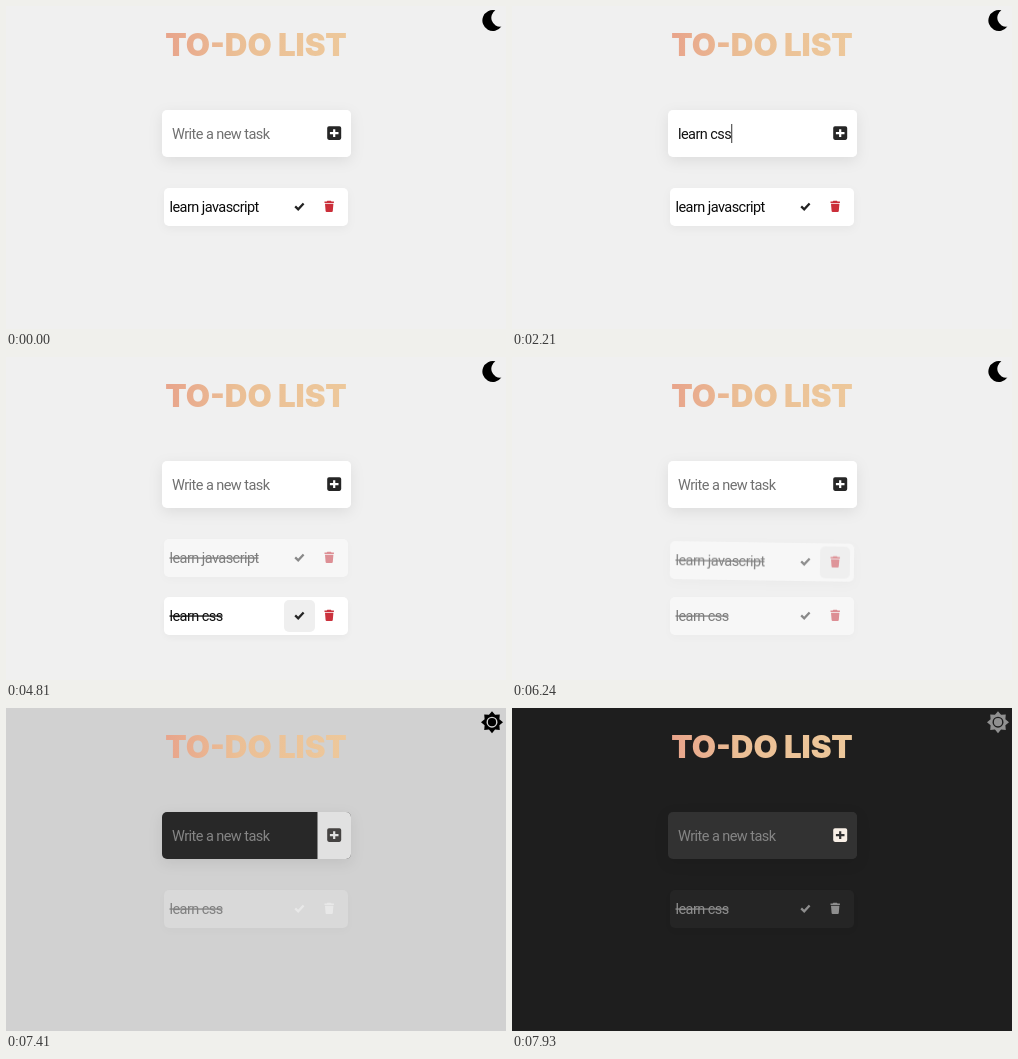
An HTML page for the animation above (8 s loop, 500 by 323 pixels).

```html
<!DOCTYPE html>
<html lang="en">
<head>
<meta charset="utf-8">
<title>To-do list</title>
<style>
  html, body { margin: 0; width: 100%; height: 100%; overflow: hidden; background: #f0f0f0; }
  svg { display: block; width: 100%; height: 100%; }
  text { font: 400 14.5px Roboto, Arial, sans-serif; letter-spacing: -.55px; white-space: pre; }
  #title { font: 900 31.3px Inter, sans-serif; letter-spacing: 0; fill: url(#peach); }
  #field { filter: drop-shadow(0 4px 7px rgba(0, 0, 0, .08)); }
  .card { filter: drop-shadow(0 3px 4px rgba(0, 0, 0, .04)); }
  .task { transform-box: fill-box; transform-origin: center; }
  .hover { fill: #efefef; opacity: 0; }
  .strike { opacity: 0; }
</style>
</head>
<body>
<svg viewBox="0 0 500 323">
  <defs>
    <linearGradient id="peach">
      <stop offset="0" stop-color="#e8a48b"/>
      <stop offset=".4" stop-color="#ebbf95"/>
      <stop offset="1" stop-color="#edc89b"/>
    </linearGradient>
    <clipPath id="fieldShape"><rect x="156" y="104" width="189" height="47" rx="5"/></clipPath>
  </defs>

  <rect id="page" width="500" height="323"/>
  <text id="title" x="250" y="50" text-anchor="middle">TO-DO LIST</text>

  <path id="moon" d="M489.4 4.3A10.5 10.5 0 1 0 495.4 20.6A8.9 8.9 0 0 1 489.4 4.3Z"/>
  <path id="sun" fill-rule="evenodd"/>

  <rect id="field" x="156" y="104" width="189" height="47" rx="5"/>
  <rect id="button" x="311.5" y="104" width="34" height="47" clip-path="url(#fieldShape)"/>
  <path id="plus" fill-rule="evenodd" d="M323 120.3h10.4q1.8 0 1.8 1.8v10q0 1.8-1.8 1.8h-10.4q-1.8 0-1.8-1.8v-10q0-1.8 1.8-1.8z
    M327.1 123.2v2.8h-3.2v2.2h3.2v2.8h2.2v-2.8h3.2v-2.2h-3.2v-2.8z"/>
  <text id="hint" x="166" y="133">Write a new task</text>
  <text id="typed" x="166" y="133" fill="#111"></text>
  <rect id="caret" y="118" width="1" height="19" fill="#333"/>

  <g id="list"></g>
</svg>

<script>
const LOOP = 8000, STEP = 130;
const ADDED = 2600, DROP = 6210, DARK = 7345, FADE = 500;
const $ = selector => document.querySelector(selector);

const taskMarkup = (id, label, width) => `
  <g transform="translate(158 182)"><g id="${id}Place"><g id="${id}" class="task">
    <rect class="card" width="184" height="38" rx="5"/>
    <rect class="hover check" x="120" y="3" width="31" height="32" rx="5"/>
    <rect class="hover bin" x="150" y="3" width="30" height="32" rx="5"/>
    <text class="label" x="5.5" y="23.8">${label}</text>
    <rect class="label strike" x="5.5" y="18.4" width="${width}" height="1.3"/>
    <path class="tick" d="M131.2 18.4l3 2.9 5.4-5.8" fill="none" stroke-width="2.3"/>
    <path class="trash" d="M163.3 12.8h3.6l.6 .8h2.4v1.5h-9.4v-1.5h2.2zM161 15.8h8.4l-.6 7.2q-.1 1-1 1h-5.2q-.9 0-1-1z"/>
  </g></g></g>`;
$('#list').innerHTML = taskMarkup('script', 'learn javascript', 89) + taskMarkup('css', 'learn css', 53);

// Eight-pointed star with a ring cut out around the core
const circle = r => `M${486 - r} 14.2a${r} ${r} 0 1 0 ${2 * r} 0a${r} ${r} 0 1 0 ${-2 * r} 0z`;
const star = Array.from({ length: 16 }, (_, i) => {
  const angle = i * Math.PI / 8, r = i % 2 ? 8 : 11;
  return `${486 + r * Math.cos(angle)} ${14.2 + r * Math.sin(angle)}`;
});
$('#sun').setAttribute('d', `M${star.join('L')}Z` + circle(5.5) + circle(4.1));

// Each change is [start ms, duration ms, new value]; duration 0 is a hard switch
const animations = [];
function track(selector, prop, value, ...changes) {
  const frames = [];
  const add = (ms, easing = 'linear') => frames.push({ [prop]: value, offset: ms / LOOP, easing });
  add(0);
  for (const [start, duration, next] of changes) {
    add(start, 'ease');
    value = next;
    add(start + duration);
  }
  add(LOOP);
  for (const element of document.querySelectorAll(selector)) {
    const animation = element.animate(frames, { duration: LOOP, iterations: Infinity });
    animation.pause();
    animations.push(animation);
  }
}

// Adding and typing
track('#hint', 'opacity', 1, [1040, 0, 0], [ADDED, 0, 1]);
track('#caret', 'opacity', 0, [520, 0, 1], [ADDED, 0, 0]);

// First task: completed, then dropped
track('#script .check', 'opacity', 0, [3200, 400, 1], [4250, 150, 0]);
track('#script .bin', 'opacity', 0, [5580, 0, 1]);
track('#script .strike', 'opacity', 0, [3860, 0, 1]);
track('#script', 'opacity', 1, [3860, FADE, .5], [DROP, FADE, 0]);
track('#script', 'transform', 'translate(0px, 0px) rotate(0deg)',
  [DROP, FADE, 'translate(0px, 80px) rotate(20deg)']);

// Second task: added, completed, moved up
track('#css', 'opacity', 0, [ADDED, 0, 1], [4790, FADE, .5]);
track('#css .check', 'opacity', 0, [4260, 150, 1], [5200, 130, 0]);
track('#css .strike', 'opacity', 0, [4790, 0, 1]);
track('#cssPlace', 'transform', 'translate(0px, 58px)', [DROP + FADE, 0, 'translate(0px, 0px)']);

// Dark theme
track('#page', 'fill', '#f0f0f0', [DARK, FADE, '#1e1e1e']);
track('#field', 'fill', '#fff', [DARK, 0, '#262626'], [DARK, FADE, '#323232']);
track('#button', 'fill', '#fff', [DARK, FADE, '#323232']);
track('#plus', 'fill', '#262626', [DARK, FADE, '#f8efe6']);
track('#hint', 'fill', '#707070', [DARK, 0, '#858585']);
track('.card', 'fill', '#fff', [DARK, FADE, '#2c2c2c']);
track('.label', 'fill', '#0a0a0a', [DARK, FADE, '#fff']);
track('.tick', 'stroke', '#222', [DARK, 0, '#fff']);
track('.trash', 'fill', '#cb2f3a', [DARK, 0, '#fff']);
track('#moon', 'opacity', 1, [DARK, 0, 0]);
track('#sun', 'opacity', 0, [DARK, 0, 1]);
track('#sun', 'fill', '#000', [7620, 300, '#909090']);

const typing = [
  [0, ''], [1040, 'l'], [1170, 'le'], [1300, 'lear'], [1430, 'learn'],
  [1820, 'learn c'], [1950, 'learn cs'], [2210, 'learn css'], [ADDED, '']
];

const start = performance.now();
function draw() {
  const elapsed = (performance.now() - start) % LOOP;
  const time = Math.floor(elapsed / STEP) * STEP;
  for (const animation of animations) animation.currentTime = time;
  const typed = $('#typed');
  typed.textContent = typing.findLast(([ms]) => ms <= time)[1];
  $('#caret').setAttribute('x', 166 + typed.getComputedTextLength());
  requestAnimationFrame(draw);
}
draw();
</script>
</body>
</html>
```
